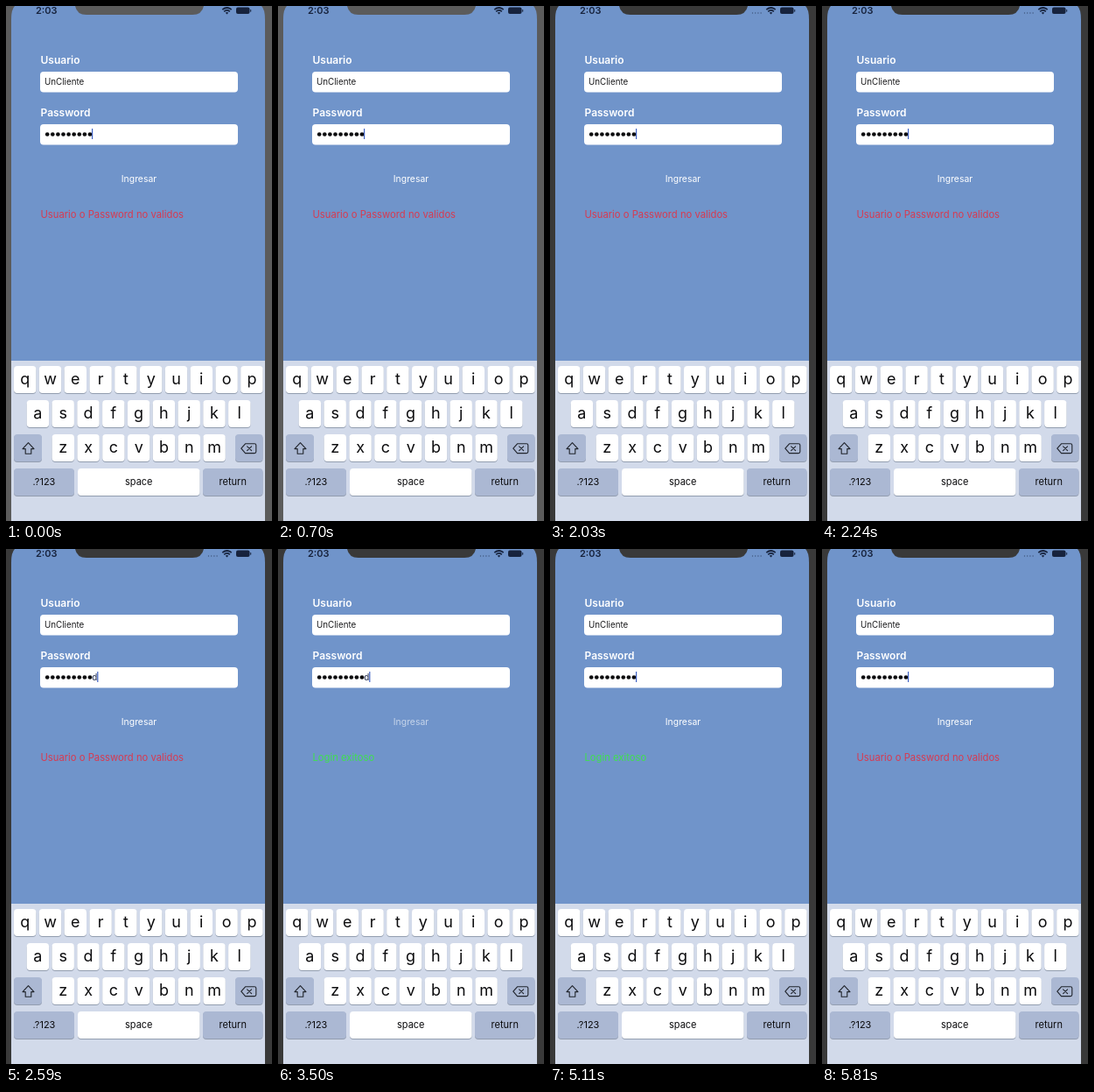
Recreate the animation shown at these times as an HTML page. Size 304x588 px, loop 5880 ms.

```html
<!DOCTYPE html>
<html lang="es">
<head>
<meta charset="utf-8">
<style>
  html, body { margin: 0; width: 100%; height: 100%; overflow: hidden; }
  svg { display: block; width: 304px; height: 588px; font-family: Inter, Roboto, sans-serif; }
</style>
</head>
<body>
<svg id="stage" viewBox="0 0 304 588" xmlns="http://www.w3.org/2000/svg">
  <rect id="bezel" width="304" height="588"/>
  <path d="M6 588V15Q6 4 10 0H292Q296 4 296 15V588Z" fill="#7094ca"/>
  <path id="notch" d="M79 0Q81 10 92 10H213Q224 10 226 0Z"/>

  <g fill="#17233d">
    <text x="34" y="9" font-size="11" font-weight="600">2:03</text>
    <g id="signal">
      <circle cx="231.5" cy="8" r=".7"/><circle cx="234.7" cy="8" r=".7"/>
      <circle cx="237.9" cy="8" r=".7"/><circle cx="241.1" cy="8" r=".7"/>
    </g>
    <g fill="none" stroke="#17233d" stroke-width="1.7">
      <path d="M247.3 4.2Q252.5 -.2 257.7 4.2M249.2 6.3Q252.5 3.5 255.8 6.3"/>
    </g>
    <path d="M250.8 7.7Q252.5 6.4 254.2 7.7L252.5 9.5Z"/>
    <rect x="263" y="1.5" width="15.5" height="7.5" rx="2"/>
    <rect x="279.2" y="4" width="1" height="2.8" rx=".5"/>
  </g>

  <g fill="#fff">
    <g font-size="12" font-weight="600">
      <text x="39.5" y="66">Usuario</text>
      <text x="39.5" y="126">Password</text>
    </g>
    <rect x="39" y="75" width="226" height="23.5" rx="4"/>
    <rect x="39" y="135" width="226" height="23.5" rx="4"/>
    <text id="submit" x="152" y="201" font-size="10.4" text-anchor="middle">Ingresar</text>
  </g>
  <text x="44" y="90" font-size="9.8" fill="#1c1c1e">UnCliente</text>
  <g id="bullets" fill="#0c0c0e"></g>
  <text id="typed" x="98.3" y="150" font-size="9.8" fill="#1c2848">d</text>
  <rect id="caret" y="140" width="1.2" height="12" fill="#3f62c4"/>
  <text id="message" x="39.5" y="241.5" font-size="11.25"></text>

  <rect x="6" y="405" width="290" height="183" fill="#d2daea"/>
  <g id="keys" text-anchor="middle" fill="#0c0c0e"></g>
  <g fill="none" stroke="#20242c" stroke-width="1.1" stroke-linejoin="round" stroke-linecap="round">
    <path d="M25.5 498.7L32 505.6H28.8V511.3H22.2V505.6H19Z"/>
    <path d="M273.5 499.8H284Q285.8 499.8 285.8 501.6V508.8Q285.8 510.6 284 510.6H273.5L268.8 505.2Z"/>
    <path d="M275.6 502.8L280.6 507.7M280.6 502.8L275.6 507.7"/>
  </g>
</svg>
<script>
const LOOP = 5880, STEP = 70;
const FOCUS_AT = 770;
const TYPE_AT = 2520, DELETE_AT = 4060;
const PRESSES = [910, 3220, 5180];
const HOLD = 140, FADE = 280;

const $ = id => document.getElementById(id);

function add(parent, tag, attrs, text = '') {
  const node = document.createElementNS('http://www.w3.org/2000/svg', tag);
  for (const name in attrs) node.setAttribute(name, attrs[name]);
  node.textContent = text;
  parent.append(node);
}

function addKey(x, y, width, label, fill = '#fff', size = 11) {
  const box = { x, width, height: 31, rx: 4 };
  add($('keys'), 'rect', { ...box, y: y + 1, fill: '#929daf' });
  add($('keys'), 'rect', { ...box, y, fill });
  const baseline = y + (size > 12 ? 21 : 19);
  add($('keys'), 'text', { x: x + width / 2, y: baseline, 'font-size': size }, label);
}

function build() {
  const modifier = '#abb8d3';
  ['qwertyuiop', 'asdfghjkl', 'zxcvbnm'].forEach((row, r) => {
    const left = [9, 23.7, 52.6][r];
    [...row].forEach((letter, i) =>
      addKey(left + 28.8 * i, 411 + 39 * r, 25.4, letter, '#fff', 18));
  });
  addKey(9, 489, 32, '', modifier);
  addKey(262, 489, 31.5, '', modifier);
  addKey(9, 528, 69, '.?123', modifier);
  addKey(82, 528, 139.5, 'space');
  addKey(225, 528, 68.5, 'return', modifier);
  for (let i = 0; i < 9; i++)
    add($('bullets'), 'circle', { cx: 47.2 + 6.1 * i, cy: 146.5, r: 2.35 });
}

// The label dims at once on touch, then fades back after release.
function submitOpacity(t) {
  const press = PRESSES.find(p => t >= p && t < p + HOLD + FADE);
  if (press === undefined) return 1;
  const back = Math.max(0, (t - press - HOLD) / FADE);
  return 0.2 + 0.8 * back;
}

function draw(t) {
  const focused = t >= FOCUS_AT;
  const frame = focused ? '#393939' : '#5b5b5b';
  $('bezel').setAttribute('fill', frame);
  $('notch').setAttribute('fill', frame);
  $('signal').setAttribute('opacity', focused ? 0.55 : 0);

  const typed = t >= TYPE_AT && t < DELETE_AT;
  $('typed').setAttribute('opacity', typed ? 1 : 0);
  $('caret').setAttribute('x', typed ? 104.2 : 98);
  $('submit').setAttribute('opacity', submitOpacity(t));

  const valid = t >= PRESSES[1] + HOLD && t < PRESSES[2] + HOLD;
  $('message').textContent = valid ? 'Login exitoso' : 'Usuario o Password no validos';
  $('message').setAttribute('fill', valid ? '#3fe04f' : '#d83a50');
}

build();
const start = performance.now();
function tick() {
  const t = (performance.now() - start) % LOOP;
  draw(Math.floor(t / STEP) * STEP);
  requestAnimationFrame(tick);
}
tick();
</script>
</body>
</html>
```
